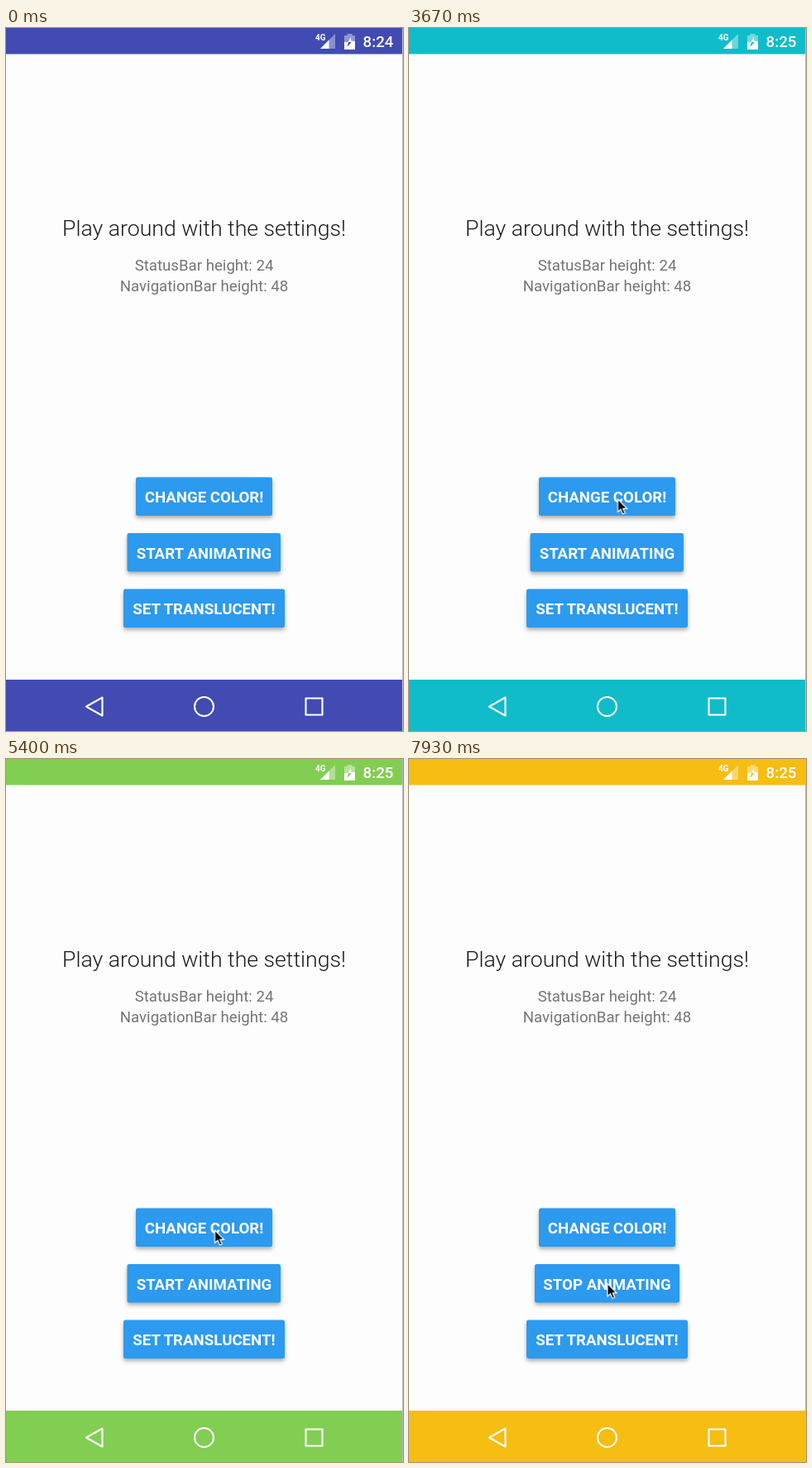
Recreate the animation shown at these times as an HTML page. Size 480x849 px, loop 8000 ms.

```html
<!DOCTYPE html>
<html lang="en">
<head>
<meta charset="utf-8">
<title>Bar colour settings</title>
<style>
  html, body { margin: 0; width: 100%; height: 100%; overflow: hidden; background: #fdfdfd; }
  svg { display: block; width: 480px; height: 849px; font-family: Roboto, sans-serif; }
  text { text-anchor: middle; }
  .bars { fill: currentColor; animation: palette 8s linear infinite; }
  .title { font-size: 26.67px; font-weight: 300; fill: #1c1c1c; }
  .info { font-size: 18.67px; fill: #757575; }
  .button { filter: drop-shadow(0 3px 2.5px rgba(0, 0, 0, .32)); }
  .button rect { fill: #2c9aef; }
  .label { font-size: 18.67px; font-weight: 700; fill: #fff; }
  .clock { font-size: 18.67px; font-weight: 500; fill: #fff; }
  .nav { fill: none; stroke: #fff; stroke-width: 2.1; stroke-linejoin: round; }

  .early { animation: hide 8s step-end infinite; }
  .late { animation: show 8s step-end infinite; }
  .minute { --swap: 1; animation-name: minute-out; }
  .minute.late { animation-name: minute-in; }
  .cursor { animation: travel 8s ease-in-out infinite; }
  .press { fill: none; stroke: #111; stroke-width: 2; animation: press 8s step-end infinite; }

  @keyframes palette {
    0%, 21.5% { color: #414bb2; }
    24%, 29.5% { color: #2c97ee; }
    32%, 38% { color: #13b1f1; }
    40.5%, 45.5% { color: #10c0d5; }
    48%, 53.5% { color: #10a485; }
    56%, 61.5% { color: #50b759; }
    64%, 86.25% { color: #82ce52; }
    88.75%, 91.5% { color: #cbe341; }
    94%, 96.5% { color: #fbe532; }
    99%, 100% { color: #f6bd12; }
  }
  @keyframes travel {
    0%, 11% { transform: translate(510px, 640px); }
    18%, 21.5% { transform: translate(261.5px, 556px); }
    27%, 72% { transform: translate(252.5px, 570px); }
    81%, 100% { transform: translate(240px, 634.5px); }
  }
  @keyframes press {
    0%, 21.5%, 29.5%, 38%, 45.5%, 53.5%, 61.5%, 85.6%, 100% { opacity: 0; }
    19.6%, 27.6%, 36.6%, 43.6%, 51.9%, 59.6%, 83.5% { opacity: 1; }
  }
  @keyframes hide { 0% { opacity: 1; } 86%, 100% { opacity: 0; } }
  @keyframes show { 0% { opacity: 0; } 86%, 100% { opacity: 1; } }
  @keyframes minute-out { 0% { opacity: 1; } 9%, 100% { opacity: 0; } }
  @keyframes minute-in { 0% { opacity: 0; } 9%, 100% { opacity: 1; } }
</style>
</head>
<body>
<svg viewBox="0 0 480 849">
  <rect width="480" height="849" fill="#fdfdfd"/>
  <g class="bars">
    <rect width="479" height="31.5"/>
    <rect y="787" width="479" height="62"/>
  </g>
  <rect x="479" width="1" height="849" fill="#bdbdc2"/>

  <!-- status icons -->
  <g fill="#fff">
    <text x="380.4" y="15" font-size="10" font-weight="700" textLength="">4G</text>
    <path d="M380 25L398 7V25Z" opacity=".38"/>
    <path d="M380 25L390.5 14.5V25Z"/>
    <path d="M412.500 7h6v2h3.500v8h-13v-8h3.500z" opacity=".42"/>
    <path d="M409 17h5l-1.500 6 6-7h3.500v10h-13z"/>
    <path d="M417 11v4.500h2.500l-1 1.500h-5z"/>
  </g>
  <text class="clock early minute" x="450" y="23.200">8:24</text>
  <text class="clock late minute" x="450" y="23.200">8:25</text>

  <text class="title" x="239.500" y="251">Play around with the settings!</text>
  <text class="info" x="239.500" y="292.500">StatusBar height: 24</text>
  <text class="info" x="239.500" y="317.500">NavigationBar height: 48</text>

  <g class="button"><rect x="157" y="542.500" width="165" height="46.500" rx="2.500"/></g>
  <g class="button early"><rect x="146.500" y="610" width="185.500" height="46.500" rx="2.500"/></g>
  <g class="button late"><rect x="152" y="610" width="175" height="46.500" rx="2.500"/></g>
  <g class="button"><rect x="142" y="677.500" width="195" height="46.500" rx="2.500"/></g>
  <g class="label">
    <text x="239.500" y="573">CHANGE COLOR!</text>
    <text class="early" x="239.500" y="640.500">START ANIMATING</text>
    <text class="late" x="239.500" y="640.500">STOP ANIMATING</text>
    <text x="239.500" y="708">SET TRANSLUCENT!</text>
  </g>

  <g class="nav">
    <path d="M97 819.500L116.500 808.500V830.500Z"/>
    <circle cx="239.500" cy="819.500" r="11.500"/>
    <rect x="362.500" y="809.500" width="20" height="20"/>
  </g>

  <g class="cursor">
    <circle class="press" r="22.500"/>
    <path d="M0 -1V14.500L3.500 11.300L6 17L8.700 15.800L6.200 10.300H11Z" fill="#000" stroke="#fff" stroke-width="1.200"/>
  </g>
</svg>
</body>
</html>
```
